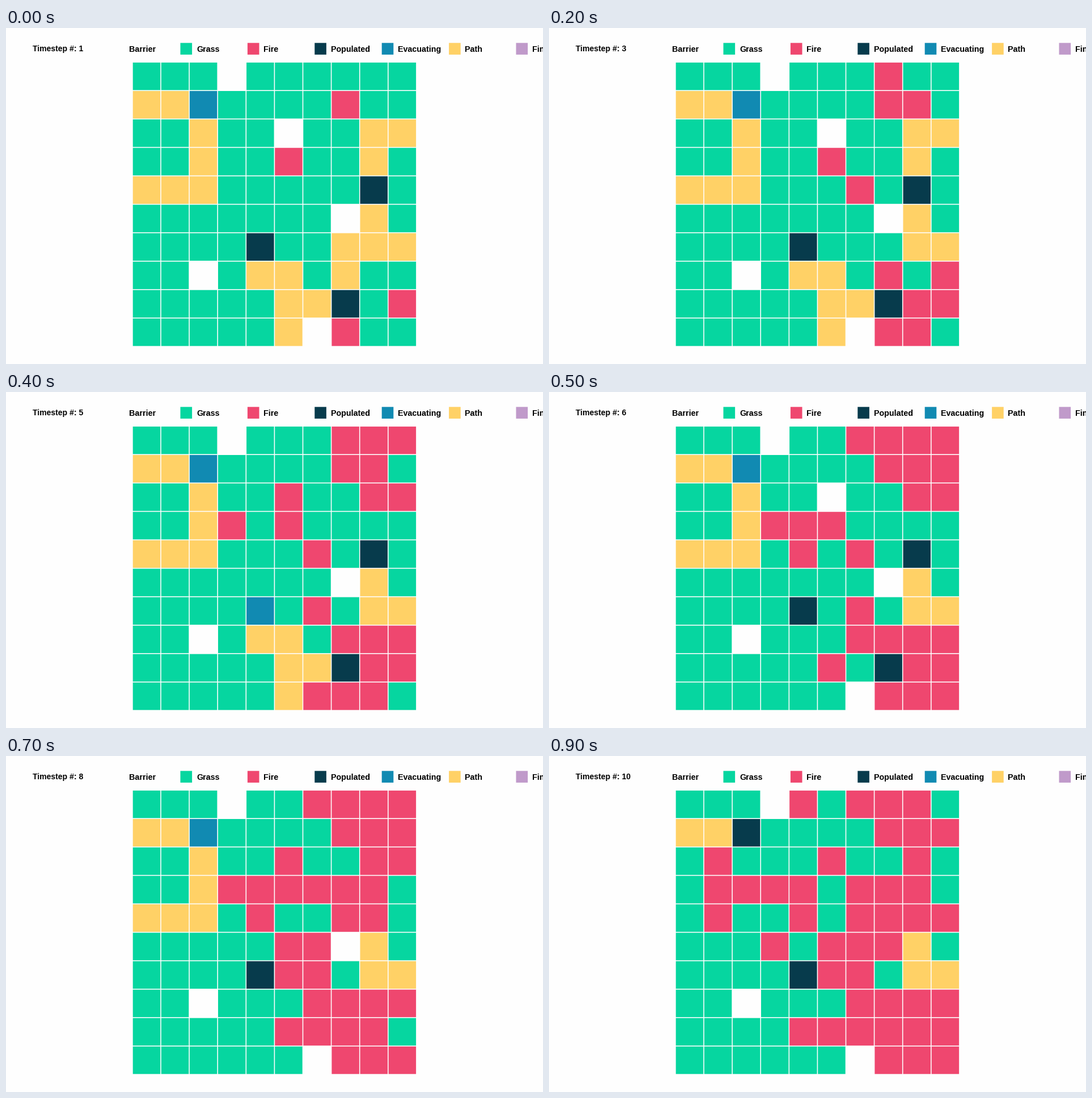
These frames come from a looping animation (947x592 px, 1 s). A matplotlib script:

```python
import matplotlib.pyplot as plt
from matplotlib.animation import FuncAnimation
from matplotlib.patches import Rectangle

WIDTH, HEIGHT, DPI = 947, 592, 100
STEPS, INTERVAL = 10, 100
SIZE = 10
LEFT, TOP, PITCH, CELL = 223.7, 60.9, 50.1, 48.5

COLORS = {
    "Barrier": "#fefefe",
    "Grass": "#06d6a0",
    "Fire": "#ef476f",
    "Populated": "#073b4c",
    "Evacuating": "#118ab2",
    "Path": "#ffd166",
    "Finished": "#c09aca",
}

# Cells are named by column letter and row digit.
START = {
    "Barrier": "D0 F2 H5 C7 G9",
    "Fire": "H1 F3 J8 H9",
    "Populated": "I4 E6 H8",
    "Evacuating": "C1",
    "Path": "A1 B1 C2 C3 A4 B4 C4 I2 J2 I3 I5 H6 I6 J6 H7 E7 F7 F8 G8 F9",
}

# State changes at each timestep after the first.
CHANGES = [
    {"Fire": "H0 J7 I9"},
    {"Fire": "I1 G4 H7 I8", "Grass": "H6"},
    {"Fire": "I0 I2 I7", "Grass": "J2 I3"},
    {"Fire": "J0 F2 J2 D3 G6 G9", "Evacuating": "E6"},
    {"Fire": "G0 J1 E3 E4 G7 F8 J9", "Grass": "E7 F7 G8 F9",
     "Barrier": "F2 G9", "Populated": "E6"},
    {"Fire": "G3 H3 H4 G5 G8"},
    {"Fire": "F2 I3 I4 F5 F6 H8", "Grass": "G4 J8"},
    {"Fire": "E0 B4 J4 J8 G9", "Grass": "C2 C3 A4 C4",
     "Barrier": "F2", "Populated": "C1"},
    {"Fire": "B2 F2 B3 C3 G4 D5 H5 E8", "Grass": "J0 J2 F3", "Barrier": "G9"},
]


def apply(grid, changes):
    updated = dict(grid)
    for state, cells in changes.items():
        updated.update((cell, state) for cell in cells.split())
    return updated


def build_history():
    field = {f"{col}{row}": "Grass" for row in range(SIZE) for col in "ABCDEFGHIJ"}
    history = [apply(field, START)]
    for changes in CHANGES:
        history.append(apply(history[-1], changes))
    return history


fig = plt.figure(figsize=(WIDTH / DPI, HEIGHT / DPI), dpi=DPI, facecolor=COLORS["Barrier"])
ax = fig.add_axes([0, 0, 1, 1])
ax.set(xlim=(0, WIDTH), ylim=(HEIGHT, 0))
ax.axis("off")


def add_square(x, y, size, color):
    return ax.add_patch(Rectangle((x, y), size, size, color=color, lw=0, snap=False))


def add_label(x, baseline, text, pixels):
    return ax.text(x, baseline, text, fontsize=pixels * 72 / DPI, color="black",
                   family="Liberation Sans", weight="bold", va="baseline")


for i, (name, color) in enumerate(COLORS.items()):
    offset = i * 118.4
    add_square(189.1 + offset, 26.3, 20.6, color)
    add_label(217.5 + offset, 42, name, 14.3)

history = build_history()
counter = add_label(46.7, 41, "", 14)
squares = {
    cell: add_square(LEFT + "ABCDEFGHIJ".index(cell[0]) * PITCH,
                     TOP + int(cell[1]) * PITCH, CELL, COLORS[state])
    for cell, state in history[0].items()
}


def draw(frame):
    counter.set_text(f"Timestep #: {frame + 1}")
    for cell, state in history[frame].items():
        squares[cell].set_facecolor(COLORS[state])
    return [counter, *squares.values()]


anim = FuncAnimation(fig, draw, frames=STEPS, interval=INTERVAL, repeat=True, repeat_delay=0)
plt.show()
```
